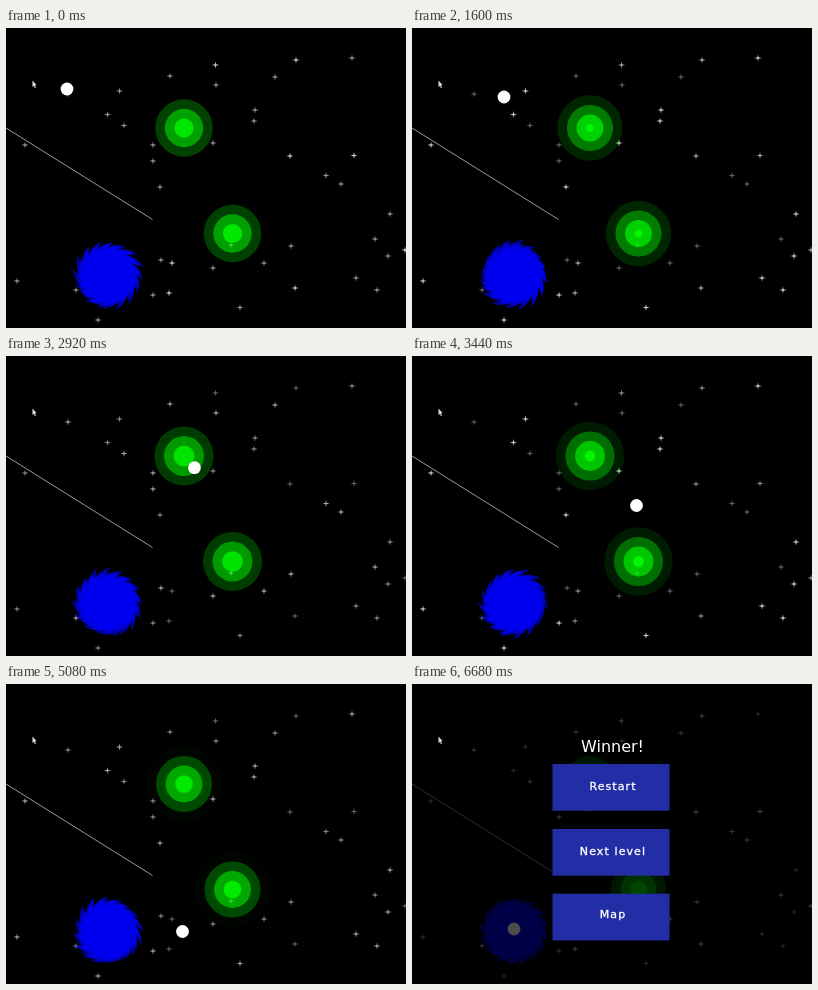
An HTML page with a canvas that plays this animation: 400x300 px, repeating every 6.72 s.

```html
<!DOCTYPE html>
<html lang="en">
<head>
<meta charset="utf-8">
<title>Gravity wells</title>
<style>
html, body { margin: 0; width: 100%; height: 100%; overflow: hidden; background: #000; }
canvas { display: block; }
</style>
</head>
<body>
<canvas id="stage" width="400" height="300"></canvas>
<script>
const ctx = document.getElementById('stage').getContext('2d');
const TAU = Math.PI * 2;
const LOOP = 6720, STEP = 40, LAUNCH = 1120, WIN = 6120, MENU = 6640;

// Star positions grouped by twinkle phase
const stars = [
  { phase: 0, at: [[62,66],[164,48],[118,97.5],[269,49],[210,57],[147,117],[147,133],[70,262],[155,232],
    [207,240],[258,235],[285,218],[369,211],[320,147.5],[335,156],[225,217]] },
  { phase: .5, at: [[113.5,63],[101.5,86.5],[346,30],[249,82],[248,93],[207,115],[154,159],[19,117],[11,253],
    [92,292],[234,279.5],[350,250],[371,262],[382,228],[384,186],[147,267]] },
  { phase: .25, at: [[209.5,37],[290,32],[284,128],[348,127.5],[166,235],[163,265],[289,260],[399,222]] }
];
const wells = [[178, 100], [226.5, 205.5]];
// Ball path: time, x, y
const path = [[LAUNCH,61,61],[1600,92,69],[2400,146.5,82.5],[3440,224.5,149.5],[4080,245,197.5],
  [5080,176.5,247.5],[WIN,102,245]];

function disc(x, y, r, color) {
  ctx.fillStyle = color;
  ctx.beginPath();
  ctx.arc(x, y, r, 0, TAU);
  ctx.fill();
}

function slope(i, k) {
  const rate = j => (path[j + 1][k] - path[j][k]) / (path[j + 1][0] - path[j][0]);
  if (i === 0) return rate(0);
  if (i === path.length - 1) return rate(i - 1);
  const before = path[i][0] - path[i - 1][0], after = path[i + 1][0] - path[i][0];
  return (rate(i - 1) * after + rate(i) * before) / (before + after);
}

function ballAt(t) {
  t = Math.max(LAUNCH, Math.min(WIN, t));
  let i = 0;
  while (i < path.length - 2 && t > path[i + 1][0]) i++;
  const a = path[i], b = path[i + 1], d = b[0] - a[0], u = (t - a[0]) / d, v = 1 - u;
  return [1, 2].map(k =>
    v * v * (1 + 2 * u) * a[k] + u * u * (3 - 2 * u) * b[k] +
    d * u * v * (v * slope(i, k) - u * slope(i + 1, k)));
}

function drawStars(t) {
  for (const { phase, at } of stars) {
    const c = Math.round(150 + 55 * Math.sin(TAU * (t / 2000 + phase)));
    ctx.fillStyle = `rgb(${c},${c},${c})`;
    for (const [x, y] of at) {
      ctx.beginPath();
      for (let i = 0; i < 8; i++) {
        const r = i % 2 ? .9 : 3.6, a = i * TAU / 8;
        ctx.lineTo(x + r * Math.cos(a), y + r * Math.sin(a));
      }
      ctx.fill();
    }
  }
}

function drawWell(x, y, t) {
  const gap = 9.6, reach = 4 * gap;
  for (let n = 4; n > 0; n--) {
    const r = gap * (n - t / 1000 % 1);
    disc(x, y, r, `rgba(0,255,0,${1 - r / reach})`);
  }
}

function drawWheel(radius, turn, teeth) {
  const step = TAU / teeth;
  const polar = (r, a) => [r * Math.cos(a), r * Math.sin(a)];
  ctx.beginPath();
  for (let i = 0; i < teeth; i++) {
    const a = turn + i * step, tip = radius * (.95 + .07 * Math.sin(i * 7.3));
    if (!i) ctx.moveTo(...polar(radius * .74, a));
    ctx.quadraticCurveTo(...polar(radius * .93, a + step * .4), ...polar(tip, a + step * 1.45));
    ctx.quadraticCurveTo(...polar(radius * .84, a + step * 1.05), ...polar(radius * .74, a + step));
  }
  ctx.fill();
}

function drawVortex(t) {
  ctx.save();
  ctx.translate(102, 247);
  ctx.fillStyle = 'rgba(0,0,255,.62)';
  drawWheel(36, -t / 320, 16);
  drawWheel(34, -t / 410 + 1, 17);
  drawWheel(32, -t / 530 + 2, 15);
  ctx.restore();
}

function drawMenu() {
  ctx.fillStyle = '#fff';
  ctx.textAlign = 'center';
  ctx.letterSpacing = '0px';
  ctx.font = '16px "DejaVu Sans", sans-serif';
  ctx.fillText('Winner!', 200.5, 68);
  ctx.font = '11px "DejaVu Sans", sans-serif';
  ctx.letterSpacing = '1.1px';
  ctx.lineWidth = .35;
  ctx.strokeStyle = '#fff';
  [['Restart', 80, 106], ['Next level', 145, 171], ['Map', 209.7, 234]].forEach(([label, top, base]) => {
    ctx.fillStyle = '#232ea6';
    ctx.fillRect(140.5, top, 117, 46.7);
    ctx.fillStyle = '#fff';
    ctx.fillText(label, 201, base);
    ctx.strokeText(label, 201, base);
  });
}

function drawCursor() {
  ctx.fillStyle = '#ddd';
  ctx.beginPath();
  [[26.5,52.5],[26.5,59],[28,57.8],[29,60.3],[30,59.8],[29,57.3],[30.6,57]].forEach(p => ctx.lineTo(...p));
  ctx.fill();
}

function draw(t) {
  const play = Math.min(t, WIN);
  ctx.fillStyle = '#000';
  ctx.fillRect(0, 0, 400, 300);
  drawStars(play);
  ctx.strokeStyle = '#999';
  ctx.lineWidth = 1;
  ctx.beginPath();
  ctx.moveTo(0, 100);
  ctx.lineTo(146.5, 191.5);
  ctx.stroke();
  drawVortex(play);
  for (const [x, y] of wells) drawWell(x, y, play);
  disc(...ballAt(play), 6.4, '#fff');
  if (t > WIN) {
    ctx.fillStyle = `rgba(0,0,0,${.7 * Math.min(1, (t - WIN) / 320)})`;
    ctx.fillRect(0, 0, 400, 300);
  }
  if (t >= MENU) drawMenu();
  drawCursor();
}

const start = performance.now();
function tick() {
  const t = (performance.now() - start) % LOOP;
  draw(Math.floor(t / STEP) * STEP);
  requestAnimationFrame(tick);
}
tick();
</script>
</body>
</html>
```
